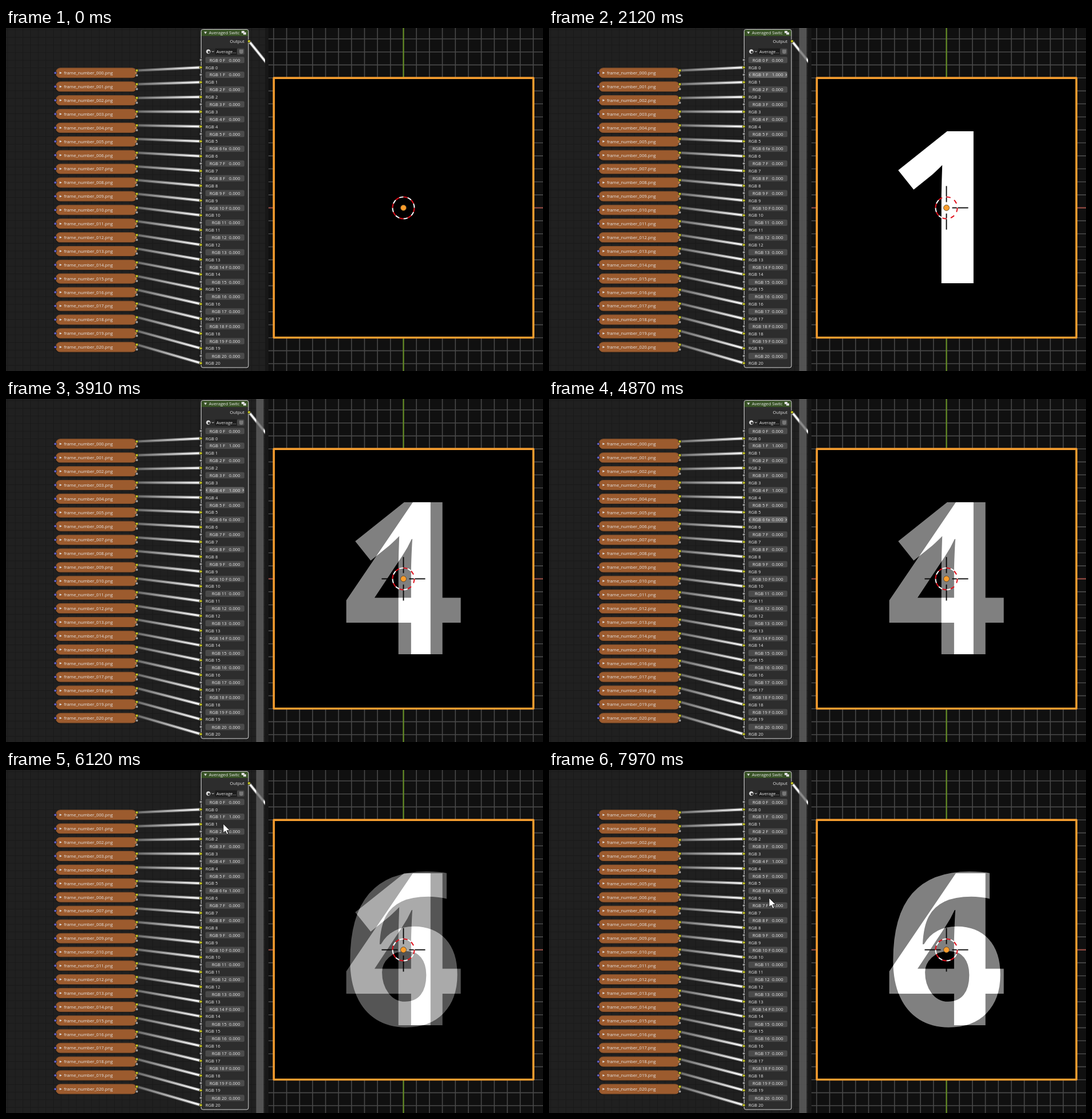
An HTML page with a canvas that plays this animation: 937 px wide and 598 px high, repeating every 8000 ms.

```html
<!DOCTYPE html>
<html lang="en">
<head>
<meta charset="utf-8">
<title>Averaged switch node</title>
<style>
html, body { margin: 0; width: 100%; height: 100%; overflow: hidden; background: #111; }
canvas { display: block; }
</style>
</head>
<body>
<canvas id="stage" width="937" height="598"></canvas>
<script>
const ctx = document.getElementById('stage').getContext('2d');
const LOOP = 8000, ROWS = 21, CX = 693.5, CY = 313.5, CELL = 22.65;
const YELLOW = '#c7c729', GREY = '#a1a1a1', BLUE = '#6363c7', LIGHT = '#e6e6e6';
const fieldY = i => 55.7 + i * 25.8;
const labelY = i => 68.7 + i * 25.78;
const imageY = i => 78.3 + i * 23.9;
const clamp = v => Math.max(0, Math.min(1, v));
const ramp = (t, from, to) => clamp((t - from) / (to - from));

// Each drag hides the pointer from press to release while the row's factor changes
const drags = [
  { row: 1, press: 1430, change: 1780, release: 2260, step: 1 },
  { row: 4, press: 3360, change: 3500, release: 4110, step: 1 },
  { row: 6, press: 4870, change: 4920, release: 5330, step: 1 },
  { row: 1, press: 7000, change: 7010, release: 7480, step: -1 }
];
const stops = [
  { x: 590, y: 610, arrive: 0, leave: 620 },
  ...drags.map(d => ({ x: 379, y: fieldY(d.row) - 0.5, arrive: d.press - 200, leave: d.release })),
  { x: 384, y: 223, arrive: 7970, leave: LOOP }
];

function pointer(t) {
  const n = Math.max(1, stops.findIndex(s => t < s.leave));
  const a = stops[n - 1], b = stops[n];
  const k = ramp(t, a.leave, b.arrive), e = 1 - (1 - k) ** 3;
  // After the first drag the pointer swings out over the picture
  const swing = n === 2 ? Math.sin(Math.PI * k) : 0;
  return { x: a.x + (b.x - a.x) * e + 288 * swing, y: a.y + (b.y - a.y) * e + 180 * swing };
}

function factors(t) {
  const values = Array(ROWS).fill(0);
  for (const d of drags) values[d.row] += d.step * ramp(t, d.change, d.change + 190);
  return values;
}

function rect(x, y, w, h, color) {
  ctx.fillStyle = color;
  ctx.fillRect(x, y, w, h);
}
function round(x, y, w, h, r, fill, stroke) {
  ctx.beginPath();
  ctx.roundRect(x, y, w, h, r);
  if (fill) { ctx.fillStyle = fill; ctx.fill(); }
  if (stroke) { ctx.strokeStyle = stroke; ctx.lineWidth = 1; ctx.stroke(); }
}
function line(points, color, width = 1) {
  ctx.beginPath();
  points.forEach(p => ctx.lineTo(...p));
  ctx.strokeStyle = color;
  ctx.lineWidth = width;
  ctx.stroke();
}
function poly(points, fill) {
  ctx.beginPath();
  points.forEach(p => ctx.lineTo(...p));
  ctx.closePath();
  ctx.fillStyle = fill;
  ctx.fill();
}
function dot(x, y, r, fill, stroke = '#111') {
  ctx.beginPath();
  ctx.arc(x, y, r, 0, 7);
  ctx.fillStyle = fill;
  ctx.fill();
  ctx.strokeStyle = stroke;
  ctx.lineWidth = 0.8;
  ctx.stroke();
}
function text(s, x, y, align = 'left') {
  ctx.font = '7.65px "Open Sans", "Noto Sans", sans-serif';
  ctx.textAlign = align;
  ctx.fillStyle = LIGHT;
  ctx.fillText(s, x, y + 2.8);
}

function link(x0, y0, x1, y1, from) {
  const g = ctx.createLinearGradient(x0, y0, x1, y1);
  g.addColorStop(0, from);
  g.addColorStop(1, '#fff');
  const ends = [[x0, y0], [x1, y1]];
  ctx.globalAlpha = 0.4;
  line(ends, g, 5.4);
  ctx.globalAlpha = 1;
  line(ends, g, 3);
}

function imageNode(i) {
  const y = imageY(i);
  round(86, y - 8, 143, 18, 8, 'rgba(0,0,0,.35)');
  round(87, y - 8.5, 141, 17, 7.5, '#9c5b2e', '#7a4a28');
  poly([[93.5, y - 2], [97.5, y], [93.5, y + 2]], '#ddd');
  text(`frame_number_${String(i).padStart(3, '0')}.png`, 101, y);
  for (const dy of [-1, 1.5]) line([[225, y + dy], [229, y + dy]], '#d9a05f');
  dot(86, y, 2.4, BLUE);
  dot(228.3, y - 4.2, 2.5, YELLOW);
  dot(228.3, y + 4.3, 2.4, GREY);
}

function field(i, value, hot) {
  const y = fieldY(i), bare = i > 10 && ![14, 18, 19].includes(i);
  round(348, y - 5.5, 68, 11, 2.5, hot ? '#626262' : '#4b4b4b');
  text(`RGB ${i}` + (bare ? '' : i === 6 ? ' fa' : ' F'), bare ? 359 : 355, y);
  text(value.toFixed(3), 408.5, y, 'right');
  if (!hot) return;
  for (const side of [-1, 1]) {
    const x = 382 + side * 31;
    line([[x, y - 2], [x + side * 1.5, y], [x, y + 2]], '#eee');
  }
}

function switchNode(values, hotRow) {
  round(340.5, 2.5, 82.5, 589.5, 3, '#2d2d2d');
  round(341, 3, 82, 11, [3, 3, 0, 0], '#385226');
  round(340.5, 2.5, 82.5, 589.5, 3, null, '#d8d8d8');
  poly([[345.5, 6.5], [350.5, 6.5], [348, 10.5]], '#ddd');
  text('Averaged Switc', 354, 8.2);
  rect(411, 5, 5, 4, '#ddd');
  rect(414, 7.5, 5, 4, '#ddd');
  text('Output', 416, 23, 'right');
  dot(424, 23, 2.6, YELLOW);

  round(348, 35.5, 17, 11, 2.5, '#2a2a2a');
  rect(365, 35.5, 38, 11, '#1d1d1d');
  round(403, 35.5, 13, 11, 2.5, '#454545');
  dot(353, 41, 3.4, '#ddd', '#ddd');
  dot(354, 42, 1.6, '#333', '#333');
  line([[359, 40], [361, 42], [363, 40]], '#ccc');
  text('Average...', 367, 41);
  round(407, 37.5, 7, 7.5, [1, 1, 4, 4], '#777');

  for (let i = 0; i < ROWS; i++) {
    field(i, values[i], i === hotRow);
    text('RGB ' + i, 348, labelY(i));
    dot(340, fieldY(i), 2.4, GREY);
    dot(340, labelY(i), 2.5, YELLOW);
  }
}

function nodeEditor(values, hotRow, barAlpha) {
  ctx.save();
  ctx.beginPath();
  ctx.rect(0, 0, 452, 598);
  ctx.clip();
  rect(0, 0, 452, 598, '#202020');
  for (let k = 0; k < 46; k++) {
    const p = 3 + k * 13.3;
    line([[p, 0], [p, 598]], '#1a1a1a');
    line([[0, p], [452, p]], '#1a1a1a');
  }
  for (let i = 0; i < ROWS; i++) link(229, imageY(i) - 4.2, 340, labelY(i), '#6c6c6c');
  link(424, 23, 454, 60, '#fff');
  for (let i = 0; i < ROWS; i++) imageNode(i);
  switchNode(values, hotRow);
  rect(436.5, 0, 13, 598, `rgba(100,100,100,${0.75 * barAlpha})`);
  ctx.restore();
  rect(452, 0, 6, 598, '#171717');
}

function viewport(values) {
  rect(458, 0, 479, 598, '#101010');
  for (let k = -13; k <= 13; k++) {
    const x = CX + k * CELL, y = CY + k * CELL;
    line([[x, 0], [x, 598]], '#484848', 1.6);
    line([[458, y], [937, y]], '#484848', 1.6);
  }
  line([[458, CY], [937, CY]], '#9c4b42', 2);
  line([[CX, 0], [CX, 598]], '#679322', 2);
  rect(467, 87, 453, 453, '#000');

  // Weighted average of the digit images
  const total = values.reduce((sum, v) => sum + v, 0);
  ctx.globalCompositeOperation = 'lighter';
  ctx.font = '700 371.2px "Open Sans", "Noto Sans", sans-serif';
  ctx.textAlign = 'left';
  values.forEach((value, digit) => {
    if (value <= 0) return;
    const level = Math.round(255 * value / total);
    ctx.fillStyle = `rgb(${level},${level},${level})`;
    ctx.fillText(digit, 587.4, 445);
  });
  ctx.globalCompositeOperation = 'source-over';

  ctx.strokeStyle = '#f39c2f';
  ctx.lineWidth = 3.6;
  ctx.lineJoin = 'round';
  ctx.strokeRect(467.3, 87.1, 452.9, 452.6);

  for (const [dx, dy] of [[1, 0], [-1, 0], [0, 1], [0, -1]])
    line([[CX + dx * 10, CY + dy * 10], [CX + dx * 38, CY + dy * 38]], '#000', 1.8);
  for (let k = 0; k < 16; k++) {
    ctx.beginPath();
    ctx.arc(CX, CY, 19, k * Math.PI / 8, (k + 1) * Math.PI / 8);
    ctx.strokeStyle = k % 2 ? '#fff' : '#e0101c';
    ctx.lineWidth = 2;
    ctx.stroke();
  }
  dot(CX, CY, 5, '#f99d2c', '#4d3a20');
}

function drawPointer({ x, y }, overField) {
  ctx.save();
  ctx.translate(x, y);
  const half = [[-10, 0], [-5, -5], [-5, -1.3]];
  const turned = half.map(([px, py]) => [-px, -py]);
  const mirror = points => points.map(([px, py]) => [px, -py]).reverse();
  const shape = overField
    ? [...half, ...mirror(turned), ...turned, ...mirror(half)]
    : [[0, 0], [0, 16], [3.8, 12.7], [6.5, 18.5], [9, 17.3], [6.4, 11.7], [11.5, 11.5]];
  poly(shape, '#fff');
  line([...shape, shape[0]], '#111', 0.9);
  ctx.restore();
}

function draw(t) {
  const values = factors(t), mouse = pointer(t);
  const drag = drags.find(d => t >= d.press && t < d.release);
  const near = Math.round((mouse.y - fieldY(0)) / 25.8);
  const hovering = mouse.x > 348 && mouse.x < 416 && Math.abs(mouse.y - fieldY(near)) < 5.6;
  const barAlpha = clamp(1 - (Math.abs(mouse.x - 443) - 66) / 70);
  viewport(values);
  nodeEditor(values, hovering ? near : -1, barAlpha);
  if (!drag) drawPointer(mouse, hovering);
}

function tick() {
  draw(performance.now() % LOOP);
  requestAnimationFrame(tick);
}
tick();
</script>
</body>
</html>
```
